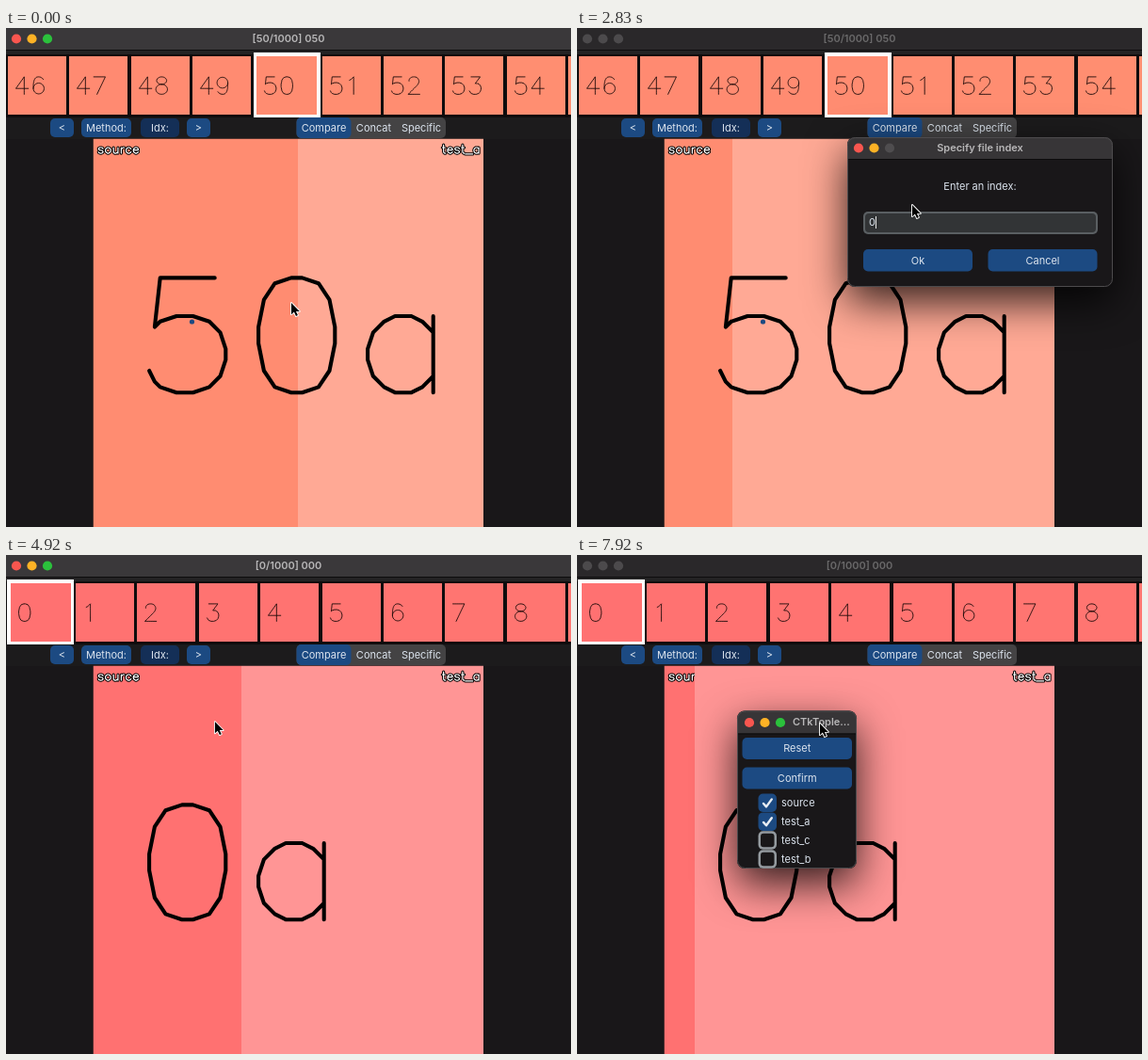
Write an HTML page with a canvas that moves like this. It is 600 by 530 pixels and loops after 8 s.

```html
<!DOCTYPE html>
<html lang="en">
<head>
<meta charset="utf-8">
<title>Image compare viewer</title>
<style>
  html, body { margin: 0; width: 100%; height: 100%; overflow: hidden; background: #191719; }
  canvas { display: block; }
</style>
</head>
<body>
<canvas id="stage" width="600" height="530"></canvas>
<script>
const ctx = document.getElementById('stage').getContext('2d');
const LOOP = 8000, LAG = 50;
const BLUE = '#1c4a82', HOVER = '#142f57', INK = '#dce4ee', DARK = '#191719';
const OPEN1 = 1480, CLOSE1 = 3740, OPEN2 = 6240, DRAG = 7040;
const LEFT = 92.5, RIGHT = 507, TOP = 117.5;

// Single-stroke letters, 21 units from top to baseline
const GLYPHS = {
  0: 'M9 0L6 1 4 4 3 9V12L4 17 6 20 9 21H11L14 20 16 17 17 12V9L16 4 14 1 11 0Z',
  1: 'M6 4L8 3 11 0V21',
  2: 'M4 5V4Q5 0 10 0T16 5Q16 8 13 11L3 21H17',
  3: 'M5 0H16L10 8H13L16 10 17 13V15L16 18 14 20 11 21H8L5 20 3 17',
  4: 'M13 21V0L3 14H18',
  5: 'M15 0H5L4 9 5 8 8 7H11L14 8 16 10 17 13V15L16 18 14 20 11 21H8L5 20 4 19 3 17',
  6: 'M16 3Q14 0 10 0 4 0 4 12V14A6.5 6.5 0 1 0 17 14A6.5 6.5 0 1 0 4 14',
  7: 'M3 0H17L7 21',
  8: 'M10 9A6 4.5 0 1 1 10 0A6 4.5 0 1 1 10 9A7 6 0 1 0 10 21A7 6 0 1 0 10 9',
  9: 'M4 18Q6 21 10 21 16 21 16 9V7A6.5 6.5 0 1 0 3 7A6.5 6.5 0 1 0 16 7',
  a: 'M15 7V21M15 10L13 8 11 7H8L6 8 4 10 3 13V15L4 18 6 20 8 21H11L13 20 15 18',
  c: 'M15 10L13 8 11 7H8L6 8 4 10 3 13V15L4 18 6 20 8 21H11L13 20 15 18',
  e: 'M3 13H15V11L14 9 11 7H8L4 10 3 13V15L4 18 8 21H11L15 18',
  o: 'M8 7L4 10 3 13V15L4 18 8 21H11L15 18 16 15V13L15 10 11 7Z',
  r: 'M4 7V21M4 13L5 10 7 8 9 7H12',
  s: 'M14 10L13 8 10 7H7L4 8 3 10 4 12 6 13 11 14 13 15 14 17V18L13 20 10 21H7L4 20 3 18',
  t: 'M5 0V17L6 20 8 21H10M2 7H9',
  u: 'M4 7V17L5 20 7 21H10L12 20 15 17M15 7V21',
  _: 'M0 23H18'
};
const ADVANCE = { a: 19, o: 19, u: 19, c: 18, e: 18, _: 18, s: 17, r: 13, t: 12 };
const ARROW = new Path2D('M0 0V12.2L2.9 9.6 5 14 6.9 13.1 4.9 8.9H8.8Z');

// Pointer stops: time, x, y
const STOPS = [
  [-100, 317, 307], [0, 303, 292], [920, 182, 157], [1330, 163, 106], [1550, 163, 106],
  [2000, 354, 183], [2500, 356, 188], [3050, 356, 188], [3400, 358, 250], [4080, 358, 250],
  [4500, 314, 232], [4670, 314, 232], [5170, 126, 120], [5620, 106, 106],
  [6350, 106, 106], [6880, 113, 464], [DRAG, 113, 464], [7700, 258, 179], [LOOP, 258, 179]
];

function pointer(t) {
  const i = Math.max(1, STOPS.findIndex(s => s[0] >= t));
  const [t0, x0, y0] = STOPS[i - 1], [t1, x1, y1] = STOPS[i];
  const p = (t - t0) / (t1 - t0), e = p * p * (3 - 2 * p);
  return { x: x0 + (x1 - x0) * e, y: y0 + (y1 - y0) * e };
}

// The divider trails the pointer and rests while another window is open
function splitAt(t) {
  if (t > 1330 && t < CLOSE1) return 165;
  if (t >= OPEN2) return 125;
  return Math.max(t < CLOSE1 ? 165 : 125, Math.round(pointer(t - LAG).x));
}

const inside = (p, x, y, w, h) => p.x >= x && p.x < x + w && p.y >= y && p.y < y + h;
const tint = (n, white) => {
  const mix = v => Math.round(v + (255 - v) * white);
  return `rgb(255,${mix(113 + .54 * n)},${mix(113)})`;
};

function rect(x, y, w, h, color) {
  ctx.fillStyle = color;
  ctx.fillRect(x, y, w, h);
}

function round(x, y, w, h, r, color) {
  ctx.beginPath();
  ctx.roundRect(x, y, w, h, r);
  ctx.fillStyle = color;
  ctx.fill();
}

function dot(x, y, r, color) {
  ctx.beginPath();
  ctx.arc(x, y, r, 0, 7);
  ctx.fillStyle = color;
  ctx.fill();
}

function text(str, x, y, { color = INK, align = 'center', weight = 400 } = {}) {
  ctx.font = `${weight} 11px Inter, Roboto, sans-serif`;
  ctx.textAlign = align;
  ctx.textBaseline = 'middle';
  ctx.fillStyle = color;
  ctx.fillText(str, x, y + .5);
}

function button(label, x, y, w, h, color = BLUE) {
  round(x, y, w, h, 5, color);
  text(label, x + w / 2, y + h / 2);
}

function strokeText(str, x, y, scale, width, color, dash = []) {
  ctx.save();
  ctx.translate(x, y);
  ctx.scale(scale, scale);
  ctx.lineCap = ctx.lineJoin = 'round';
  ctx.lineWidth = width / scale;
  ctx.strokeStyle = color;
  ctx.setLineDash(dash);
  for (const ch of str) {
    ctx.stroke(new Path2D(GLYPHS[ch]));
    ctx.translate(ADVANCE[ch] || 20, 0);
  }
  ctx.restore();
}

function lights(x, y, colors) {
  colors.forEach((c, i) => dot(x + 16.5 * i, y, 5.1, c));
}

function titleBar(title, focused) {
  rect(0, 0, 600, 23, focused ? '#3a383a' : '#2a282a');
  rect(0, 23, 600, 1, '#0d0c0d');
  lights(11, 11.5, focused ? ['#f9564f', '#fdb225', '#2bc13c'] : Array(3).fill('#4c4a4c'));
  text(title, 300, 11, { weight: 600, color: focused ? '#b8b7b8' : '#6a696a' });
}

function thumbs(first, selected) {
  rect(0, 24, 600, 4, '#242324');
  rect(0, 28, 600, 67, '#0e0c0d');
  for (let i = 0; i < 10; i++) {
    const n = first + i, base = 65.4 * i;
    let x = Math.round(base + (n < selected ? 2 : 8.5)), w = 62;
    if (n === selected) {
      rect(Math.round(base + 1), 26, 71, 69, '#fff');
      x = Math.round(base + 4.5);
      w = 64;
    }
    rect(x, 30, w, 62, tint(n, 0));
    if (i < 9) strokeText(String(n), x + 5.9, 51.9, .88, .9, '#1c0b09', [1.6, .8]);
  }
}

function toolbar(p) {
  rect(0, 95, 600, 23, '#1c1b1c');
  button('<', 47, 96, 25, 20);
  button('Method:', 80, 96, 53, 20, inside(p, 80, 96, 53, 20) ? HOVER : BLUE);
  button('Idx:', 143, 96, 41, 20, HOVER);
  button('>', 192, 96, 25, 20);
  round(308.5, 95, 158.5, 22, 5, '#444344');
  round(308.5, 95, 58, 22, 5, BLUE);
  text('Compare', 337.5, 106);
  text('Concat', 390.5, 106);
  text('Specific', 441, 106);
}

function label(str, x) {
  strokeText(str, x, 124, .43, 3.2, '#000');
  strokeText(str, x, 124, .43, 1.2, '#fff');
}

function half(x, w, n, white, digits, name, nameX) {
  ctx.save();
  ctx.beginPath();
  ctx.rect(x, TOP, w, 530);
  ctx.clip();
  rect(x, TOP, w, 530, tint(n, white));
  strokeText(digits, 134.7, 265.4, 5.8, 4.1, '#000');
  label(name, nameX);
  ctx.restore();
}

function panel(x, y, w, h, bar) {
  ctx.save();
  ctx.shadowColor = 'rgba(0,0,0,.8)';
  ctx.shadowBlur = 44;
  ctx.shadowOffsetY = 16;
  round(x, y, w, h, 8, DARK);
  ctx.restore();
  round(x, y, w, bar, [8, 8, 0, 0], '#373537');
  rect(x, y + bar, w, 1, '#0d0c0d');
  ctx.beginPath();
  ctx.roundRect(x + .5, y + .5, w - 1, h - 1, 8);
  ctx.lineWidth = 1;
  ctx.strokeStyle = '#4d4b4d';
  ctx.stroke();
}

function indexDialog(t, p) {
  panel(287, 116, 282, 159, 23);
  lights(299, 127.5, ['#f9564f', '#fdb225', '#4f4d4f']);
  text('Specify file index', 428, 127, { weight: 600, color: '#b8b7b8' });
  text('Enter an index:', 428, 168);
  round(304, 195, 249, 24, 5, '#5a5f62');
  round(306, 197, 245, 20, 4, '#323436');
  const typed = t >= 2800;
  if (typed) text('0', 310, 206.5, { align: 'left' });
  rect(typed ? 317 : 309, 200, 1, 13, '#e8e8e8');
  button('Ok', 304, 235, 116, 23.5, inside(p, 304, 235, 116, 24) ? HOVER : BLUE);
  button('Cancel', 436.5, 235, 116, 23.5);
}

function methodWindow(x, y) {
  panel(x - 1, y - .5, 127, 167.5, 24);
  lights(x + 12, y + 12, ['#f9564f', '#fdb225', '#2bc13c']);
  text('CTkTople...', x + 58, y + 11.5, { weight: 600, color: '#b8b7b8', align: 'left' });
  button('Reset', x + 4.5, y + 28, 116.5, 23);
  button('Confirm', x + 4.5, y + 59.5, 116.5, 23);
  ['source', 'test_a', 'test_c', 'test_b'].forEach((name, i) => {
    const bx = x + 21.5, by = y + 87.5 + 19.9 * i;
    round(bx, by, 19.5, 19.5, 5, i < 2 ? BLUE : '#949a9f');
    if (i < 2) {
      ctx.lineWidth = 2.4;
      ctx.lineCap = ctx.lineJoin = 'round';
      ctx.strokeStyle = '#e8edf3';
      ctx.stroke(new Path2D(`M${bx + 5.5} ${by + 10.5}l3 3.4 5.8 -8`));
    } else {
      round(bx + 2.5, by + 2.5, 14.5, 14.5, 3, DARK);
    }
    text(name, x + 46, by + 9.5, { align: 'left' });
  });
}

function draw(t) {
  const p = pointer(t), split = splitAt(t), n = t < CLOSE1 ? 50 : 0;
  const asking = t >= OPEN1 && t < CLOSE1, picking = t >= OPEN2;
  rect(0, 0, 600, 530, DARK);
  titleBar(n ? '[50/1000] 050' : '[0/1000] 000', !asking && !picking);
  thumbs(n ? 46 : 0, n);
  toolbar(p);
  half(LEFT, split - LEFT, n, 0, String(n), 'source', 97);
  half(split, RIGHT - split, n, .25, n + 'a', 'test_a', 462.5);
  if (n) dot(197.5, 312, 2.6, BLUE);
  if (asking) indexDialog(t, p);
  if (picking) {
    const grip = pointer(Math.max(DRAG, t - LAG));
    methodWindow(Math.round(grip.x - 87), Math.round(grip.y - 13));
  }
  ctx.save();
  ctx.translate(p.x, p.y);
  ctx.lineJoin = 'round';
  ctx.lineWidth = 1.8;
  ctx.strokeStyle = '#fff';
  ctx.stroke(ARROW);
  ctx.fillStyle = '#000';
  ctx.fill(ARROW);
  ctx.restore();
}

const start = performance.now();
function tick(now) {
  const t = Math.max(0, now - start) % LOOP;
  draw(Math.min(LOOP, Math.floor((t + 4) * .012) / .012));
  requestAnimationFrame(tick);
}
tick(start);
</script>
</body>
</html>
```
